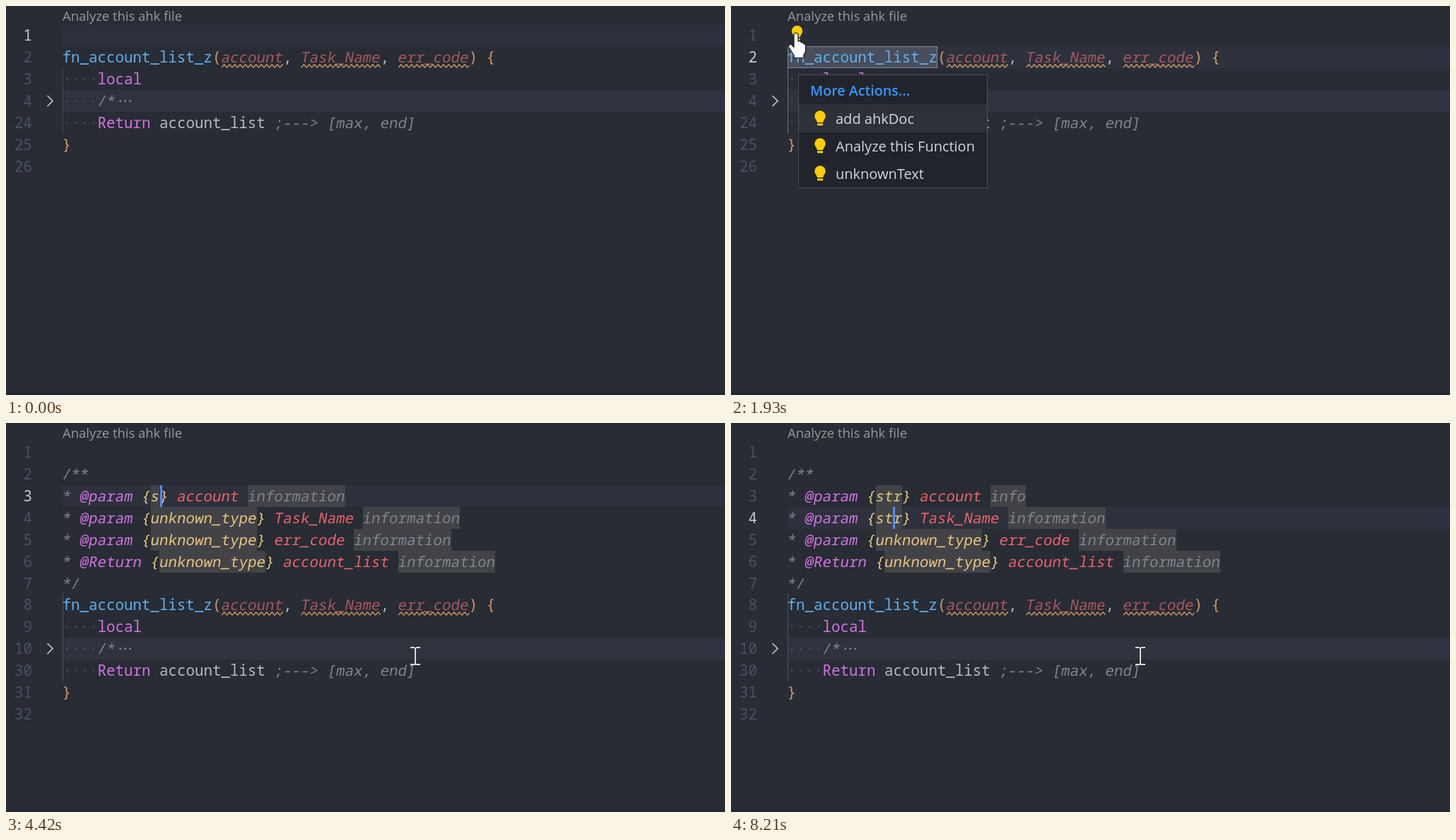
Recreate the animation shown at these times as an HTML page with a canvas. Size 1017x551 px, loop 8.24 s.

```html
<!DOCTYPE html>
<html lang="en">
<head>
<meta charset="utf-8">
<title>Doc comment snippet</title>
<style>
html, body { margin: 0; width: 100%; height: 100%; overflow: hidden; background: #282c34; }
canvas { display: block; width: 1017px; height: 551px; }
</style>
</head>
<body>
<canvas id="stage" width="1017" height="551"></canvas>
<script>
const ctx = document.getElementById('stage').getContext('2d');
const W = 1017, H = 551, LOOP = 8240;
const LEFT = 80, TOP = 26.2, ROW = 30.9, CH = 12.5;
const BASE = 22.5, SLANT = 0.17;
const MONO = '20.833px "Noto Sans Mono", "DejaVu Sans Mono", monospace';
const SANS = '"Open Sans", "Noto Sans", sans-serif';
const C = {
  bg: '#282c34', line: '#2c313c', fold: '#2f333d', num: '#495162', text: '#b4bac5',
  blue: '#61afef', red: '#eb626c', purple: '#d272e3', yellow: '#e9c57c',
  orange: '#d19a66', gray: '#7f848e', dim: '#a9565f', bulb: '#ffcc00'
};

// Cues in ms
const CLICK = 560, WORD = 760, BULB = 800, HOVER = [1080, 1420];
const MENU = [1890, 3080], INSERT = 3310;
const NO_LINT = [[5170, 5340], [7220, 7420]];
const TYPE1 = [[0, 'unknown_type'], [4350, 's'], [4650, 'st'], [4830, 'str']];
const INFO1 = [[0, 'information'], [6240, 'i'], [6430, 'in'], [6700, 'inf'], [6860, 'info']];
const TYPE2 = [[0, 'unknown_type'], [7720, 's'], [8020, 'st'], [8210, 'str']];

// Caret stops: time, row, column
const CARET = [
  [3310, 2, 22], [4350, 2, 11], [4650, 2, 12], [4830, 2, 13], [5220, 2, 34],
  [6240, 2, 24], [6430, 2, 25], [6700, 2, 26], [6860, 2, 27],
  [7370, 3, 22], [7720, 3, 11], [8020, 3, 12], [8210, 3, 13]
];

// Pointer path: time, x, y
const MOUSE = [
  [30, 680, 196], [560, 170, 76], [810, 150, 73], [910, 150, 73], [1100, 146, 16],
  [1280, 144, 14], [1560, 90, 31], [1830, 90, 31], [1950, 92, 38], [2330, 197, 156],
  [2600, 197, 156], [2630, 206, 155], [2690, 211, 156], [2830, 211, 156], [2860, 212, 157],
  [3100, 212, 160], [3300, 270, 165], [3550, 318, 166], [3700, 400, 220],
  [3860, 552, 312], [4020, 578, 330]
];

const HAND = new Path2D('M-3 3C-3-1 3-1 3 3V12Q7 11 7.5 14Q11 13 11 16Q13.5 15 13.5 18V25' +
  'Q13.5 29 11 31V35.5H-3V32L-10 21C-12 17-8 15-6 17L-3 20Z');

const within = (t, [a, b]) => t >= a && t < b;
const last = (list, t) => list.reduce((hit, item) => (t >= item[0] ? item : hit), list[0]);
const valueAt = (list, t) => last(list, t)[1];
const rowY = r => Math.round(TOP + r * ROW);
const rowH = r => rowY(r + 1) - rowY(r);
const colX = c => LEFT + c * CH;

function rect(x, y, w, h, color) {
  ctx.fillStyle = color;
  ctx.fillRect(x, y, w, h);
}

function band(r, color) {
  rect(LEFT, rowY(r), W - LEFT, rowH(r), color);
}

function frameRect(x, y, w, h, color) {
  ctx.strokeStyle = color;
  ctx.lineWidth = 1;
  ctx.strokeRect(x + 0.5, y + 0.5, w - 1, h - 1);
}

function label(str, x, y, color, font) {
  ctx.font = font;
  ctx.fillStyle = color;
  ctx.fillText(str, x, y);
}

function code(str, x, y, color, slanted) {
  ctx.save();
  ctx.translate(x - (slanted ? 1.5 : 0.6), y);
  if (slanted) ctx.transform(1, 0, -SLANT, 1, 0, 0);
  label(str, 0, 0, color, MONO);
  ctx.restore();
}

// Each part: text, colour, slanted, box ('plain' | 'match' | 'select')
function line(r, parts, col = 0) {
  for (const [str, color, slanted, box] of parts) {
    const end = col + str.length;
    if (box) {
      const x = Math.floor(colX(col)), w = Math.floor(colX(end)) - x;
      const fill = { plain: '#414347', match: '#4a4b4e', select: '#515661' }[box];
      rect(x, rowY(r), w, rowH(r), fill);
      if (box === 'match') frameRect(x, rowY(r), w + 1, rowH(r), '#c3c4c6');
    }
    code(str, colX(col), rowY(r) + BASE, color, slanted);
    col = end;
  }
}

function gutter(nums, active) {
  nums.forEach((n, r) => {
    const s = String(n);
    code(s, 37.5 - s.length * CH, rowY(r) + BASE, r === active ? '#c3c7cf' : C.num);
  });
}

function squiggle(r, col, len) {
  const x0 = colX(col), y = rowY(r) + 28;
  ctx.strokeStyle = C.orange;
  ctx.lineWidth = 1.4;
  ctx.beginPath();
  for (let x = 0; x <= len * CH; x++) {
    ctx.lineTo(x0 + x, y + 1.9 * Math.cos(x * 2 * Math.PI / 7.5));
  }
  ctx.stroke();
}

function dots(r) {
  for (let c = 0; c < 4; c++) rect(colX(c) + 5, rowY(r) + 14.5, 2.4, 2.4, '#4a505b');
}

// The function, with its head on row r
function func(r, lint, guide) {
  const param = lint ? C.dim : C.red, y = rowY(r + 2);
  band(r + 2, C.fold);
  line(r, [
    ['fn_account_list_z', C.blue], ['(', C.orange], ['account', param, 1], [', ', C.text],
    ['Task_Name', param, 1], [', ', C.text], ['err_code', param, 1], [') {', C.orange]
  ]);
  if (lint) [[18, 7], [27, 9], [38, 8]].forEach(([c, n]) => squiggle(r, c, n));
  for (let i = 1; i < 4; i++) dots(r + i);
  line(r + 1, [['local', C.purple]], 4);
  line(r + 2, [['/*', C.gray, 1]], 4);
  for (let i = 0; i < 3; i++) rect(160.5 + i * 7, y + 14.5, 2.5, 2.5, C.gray);
  line(r + 3, [['Return', C.purple], [' account_list ', C.text], [';---> [max, end]', C.gray, 1]], 4);
  line(r + 4, [['}', C.orange]]);
  const start = r > 1 ? rowY(r) - 1 : rowY(r + 1);
  rect(LEFT, start, 1, rowY(r + 4) - start, guide);
  ctx.strokeStyle = '#c5c5c5';
  ctx.lineWidth = 1.7;
  ctx.beginPath();
  ctx.moveTo(58.5, y + 8);
  ctx.lineTo(66, y + 15.5);
  ctx.lineTo(58.5, y + 23);
  ctx.stroke();
}

function bulb(x, y) {
  ctx.fillStyle = C.bulb;
  ctx.beginPath();
  ctx.arc(x, y, 7.7, 0.25 * Math.PI, 0.75 * Math.PI, true);
  ctx.lineTo(x - 4, y + 9);
  ctx.lineTo(x + 4, y + 9);
  ctx.fill();
  rect(x - 4, y + 10.3, 8, 3, C.bulb);
}

function menu() {
  rect(95, 97, 268, 161, '#21252b');
  rect(96, 139, 266, 40, '#2c313a');
  frameRect(95, 97, 268, 161, '#4d4f53');
  label('More Actions...', 112, 127, '#3794ff', '600 19.7px ' + SANS);
  ['add ahkDoc', 'Analyze this Function', 'unknownText'].forEach((item, i) => {
    bulb(126, 156 + i * 39);
    label(item, 148, 167 + i * 39, '#d4d7dd', '20px ' + SANS);
  });
}

function before(t) {
  const active = t < CLICK ? 0 : 1;
  band(active, C.line);
  if (t >= WORD) {
    const w = Math.floor(17 * CH), y = rowY(1);
    rect(LEFT, y, w, rowH(1), '#484e5b');
    frameRect(LEFT, y, w, rowH(1), '#848992');
  }
  gutter([1, 2, 3, 4, 24, 25, 26], active);
  func(1, true, t < CLICK ? '#434852' : '#6a6f79');
  if (t >= BULB) bulb(93.5, 35.5);
  if (within(t, MENU)) menu();
}

function docLine(r, tag, type, name, info, typeBox, infoBox) {
  line(r, [
    ['* ', C.gray, 1], [tag, C.purple, 1], [' {', C.yellow, 1], [type, C.yellow, 1, typeBox],
    ['} ', C.yellow, 1], [name + ' ', C.red, 1], [info, C.gray, 1, infoBox]
  ]);
}

function after(t) {
  const active = last(CARET, t)[1];
  const pickType1 = t < 4350, pickInfo = within(t, [5220, 6240]), pickType2 = within(t, [7370, 7720]);
  const picking = pickType1 || pickInfo || pickType2;
  if (!picking) band(active, C.line);
  gutter([1, 2, 3, 4, 5, 6, 7, 8, 9, 10, 30, 31, 32], active);

  const typeBox = pickType1 || pickType2 ? 'match' : 'plain';
  const infoBox = pickInfo ? 'match' : 'plain';
  line(1, [['/**', C.gray, 1]]);
  docLine(2, '@param', valueAt(TYPE1, t), 'account', valueAt(INFO1, t),
    pickType1 ? 'select' : 'plain', pickInfo ? 'select' : 'plain');
  docLine(3, '@param', valueAt(TYPE2, t), 'Task_Name', 'information',
    pickType2 ? 'select' : typeBox, infoBox);
  docLine(4, '@param', 'unknown_type', 'err_code', 'information', typeBox, infoBox);
  docLine(5, '@Return', 'unknown_type', 'account_list', 'information', typeBox, infoBox);
  line(6, [['*/', C.gray, 1]]);
  func(7, !NO_LINT.some(span => within(t, span)), '#4b515c');
  caret(t);
}

// The caret glides to each stop in 80 ms, then blinks
function caret(t) {
  const stop = last(CARET, t), from = CARET[Math.max(0, CARET.indexOf(stop) - 1)];
  const age = t - stop[0];
  if (age >= 580 && Math.floor((age - 580) / 500) % 2 === 0) return;
  const left = 1 - Math.min(1, age / 80), k = 1 - left * left;
  const mix = i => from[i] + (stop[i] - from[i]) * k;
  rect(Math.floor(colX(mix(2))) - 1, rowY(mix(1)), 3, rowH(stop[1]), '#528bff');
}

function pointer(t) {
  if (t < MOUSE[0][0]) return;
  const a = last(MOUSE, t), b = MOUSE[MOUSE.indexOf(a) + 1] || a;
  const k = a === b ? 0 : (t - a[0]) / (b[0] - a[0]), e = k * k * (3 - 2 * k);
  const x = a[1] + (b[1] - a[1]) * e, y = a[2] + (b[2] - a[2]) * e;
  ctx.save();
  ctx.translate(Math.round(x), Math.round(y));
  if (within(t, [1040, MENU[1]])) {
    ctx.fillStyle = '#fff';
    ctx.strokeStyle = '#111';
    ctx.lineWidth = 1.2;
    ctx.fill(HAND);
    ctx.stroke(HAND);
  } else {
    const ink = '#d9d9cf';
    rect(0, -12, 2, 25, ink);
    for (const top of [-13, 11]) {
      rect(-6, top, 6, 2, ink);
      rect(2, top, 6, 2, ink);
    }
  }
  ctx.restore();
}

function draw(t) {
  rect(0, 0, W, H, C.bg);
  rect(0, 548, W, 3, '#23272e');
  const hover = within(t, HOVER);
  label('Analyze this ahk file', LEFT, 21, hover ? '#4a97dd' : '#999999', '18.44px ' + SANS);
  if (t < INSERT) before(t);
  else after(t);
  pointer(t);
}

const begin = performance.now();
function tick() {
  draw((performance.now() - begin) % LOOP);
  requestAnimationFrame(tick);
}
tick();
</script>
</body>
</html>
```
